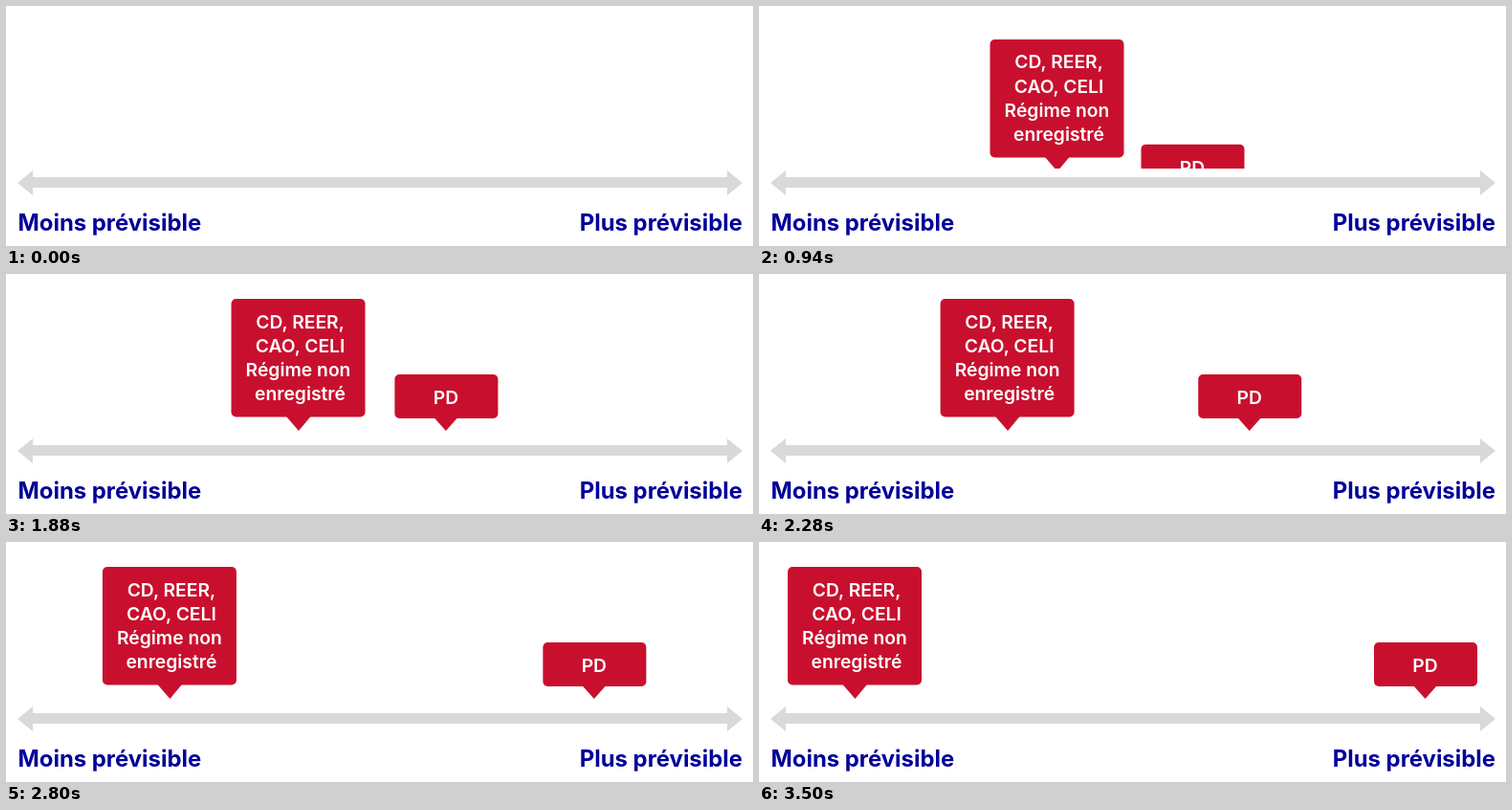
An HTML page for the animation above (3600 ms loop, 781 px wide and 251 px high).

```html
<!DOCTYPE html>
<html lang="fr">
<head>
<meta charset="utf-8">
<title>Prévisibilité</title>
<style>
  html, body { margin: 0; width: 100%; height: 100%; overflow: hidden; background: #fff; }
  svg { display: block; font-family: Inter, "Open Sans", sans-serif; }
  .axis { fill: #d9d9d9; }
  .label { fill: #000099; font-size: 23.9px; font-weight: 650; }
  .card { fill: #c8102e; }
  .card text { fill: #fff; font-size: 19.3px; font-weight: 560; text-anchor: middle; }
</style>
</head>
<body>
<svg width="781" height="251" viewBox="0 0 781 251">
  <clipPath id="above"><rect width="781" height="170"/></clipPath>
  <path class="axis" d="M12 185L28 172V179H754V172L770 185L754 198V190H28V198Z"/>
  <text class="label" x="12.5" y="235">Moins prévisible</text>
  <text class="label" x="770" y="235" text-anchor="end">Plus prévisible</text>
  <g clip-path="url(#above)">
    <g class="card" id="variable">
      <rect x="-70" y="26" width="140" height="123.5" rx="5"/>
      <path d="M-12.5 149H13L.5 164Z"/>
      <text x="2" y="56.5">CD, REER,</text>
      <text x="2" y="81.8">CAO, CELI</text>
      <text x="0" y="107">Régime non</text>
      <text x="2" y="132">enregistré</text>
    </g>
    <g class="card" id="fixed">
      <rect x="-54" y="105" width="108" height="46" rx="5"/>
      <path d="M-13 150H12L-.5 164Z"/>
      <text x="-.5" y="136">PD</text>
    </g>
  </g>
</svg>
<script>
  const LOOP = 3600, RISE = 1100, DROP = 158.5;
  const SPREAD_START = 1700, SPREAD = 1800;
  const cards = [
    { el: document.getElementById("variable"), from: 311.5, to: 100, delay: 0 },
    { el: document.getElementById("fixed"), from: 453.5, to: 697, delay: 200 },
  ];

  function ease(start, duration, t) {
    const u = Math.min(1, Math.max(0, (t - start) / duration));
    return u * u * (3 - 2 * u);
  }

  function draw() {
    const t = performance.now() % LOOP;
    const spread = ease(SPREAD_START, SPREAD, t);
    for (const { el, from, to, delay } of cards) {
      const x = from + (to - from) * spread;
      const y = DROP * (1 - ease(delay, RISE, t));
      el.setAttribute("transform", `translate(${x} ${y})`);
    }
    requestAnimationFrame(draw);
  }
  draw();
</script>
</body>
</html>
```
